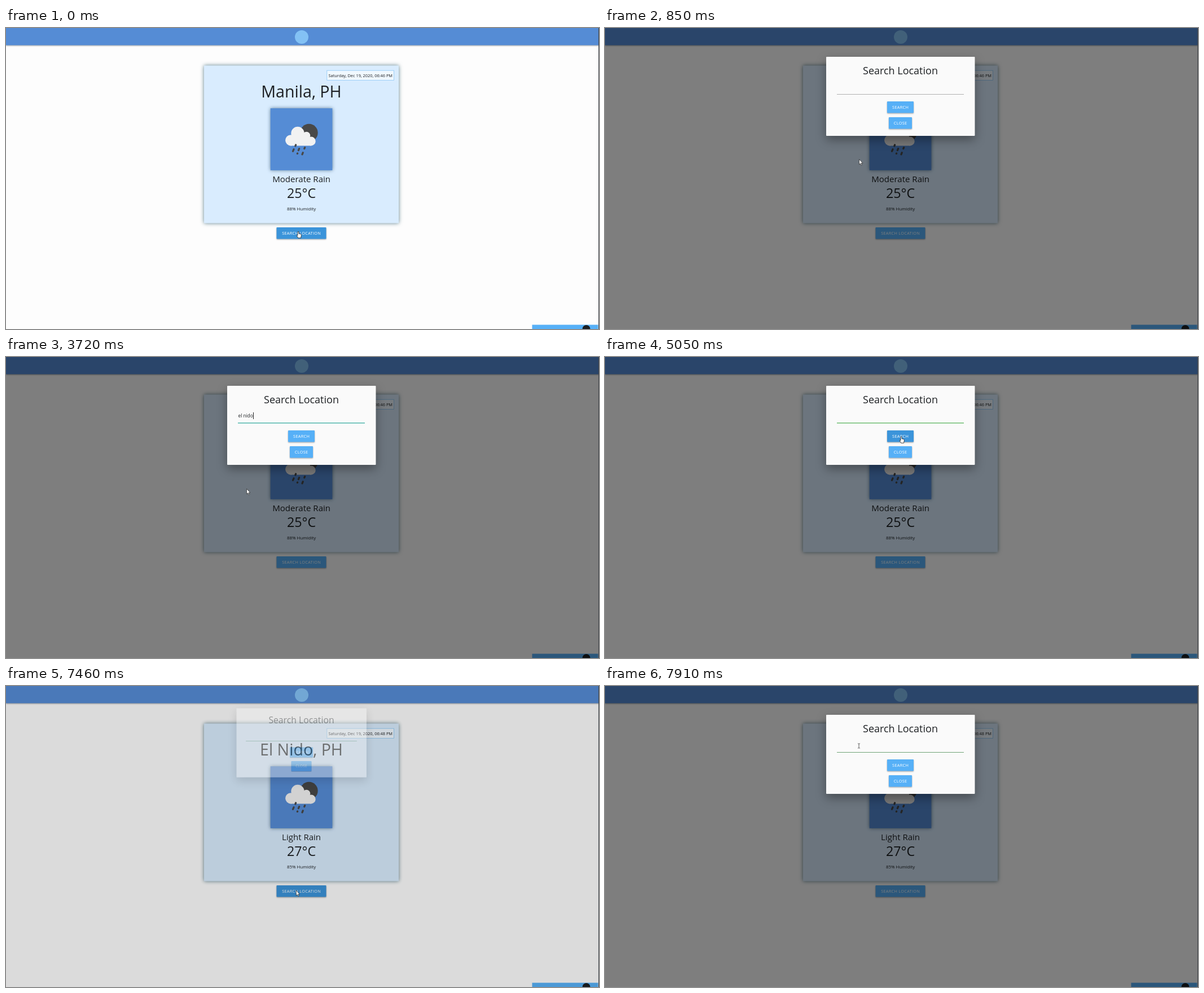
Recreate the animation shown at these times as an HTML page. Size 1051 px wide and 533 px high, loop 7.99 s.

```html
<!DOCTYPE html>
<html lang="en">
<head>
<meta charset="utf-8">
<title>Weather search</title>
<style>
  html, body { margin: 0; width: 100%; height: 100%; overflow: hidden; background: #fdfdfd; }
  svg { display: block; width: 1051px; height: 533px; font-family: "Open Sans", "Noto Sans", sans-serif; }
  text { fill: #1d2023; }
  .mid { text-anchor: middle; }
  .btn rect { fill: #56b0f7; filter: drop-shadow(0 1px .8px rgba(0,0,0,.35)); }
  .btn.hover rect { fill: #3b94da; }
  .btn text { fill: #fff; font-size: 7.35px; letter-spacing: .27px; text-anchor: middle; }
  #card { fill: #d9ecfe; filter: drop-shadow(0 0 3.5px rgba(50,95,110,.8)); }
  #tile { fill: #558cd5; filter: drop-shadow(0 0 3px rgba(40,80,110,.7)); }
  #bar { fill: #558cd5; filter: drop-shadow(0 1px 1px rgba(0,0,0,.35)); }
  #sheet { fill: #fafafa; filter: drop-shadow(0 7px 9px rgba(0,0,0,.35)); }
  #list > rect:first-child { fill: #fff; filter: drop-shadow(0 1px 1.5px rgba(0,0,0,.4)); }
  #list text { font-size: 6.75px; font-weight: 600; }
</style>
</head>
<body>
<svg viewBox="0 0 1051 533">
  <rect width="1051" height="533" fill="#fdfdfd"/>
  <rect id="bar" width="1051" height="30.5"/>
  <circle cx="524" cy="16" r="12" fill="#83c1f4"/>
  <rect x="932.5" y="525.5" width="117" height="8" fill="#56b0f7"/>
  <circle cx="1028.5" cy="533" r="7" fill="#1b1f23"/>

  <rect id="card" x="351" y="66.5" width="345" height="279"/>
  <rect x="568.8" y="75.2" width="118.6" height="17.3" fill="#f0f8ff" stroke="#8cc8f5" stroke-width=".8"/>
  <text id="date" class="mid" x="628.3" y="86.8" font-size="7.38"/>
  <text id="city" class="mid" x="523.5" y="122.5" font-size="28.6"/>
  <rect id="tile" x="468.7" y="142.2" width="109.7" height="109.7"/>
  <circle cx="537" cy="185.5" r="15.7" fill="#484848"/>
  <g fill="#f2f2f2">
    <circle cx="504.7" cy="198.8" r="9.6"/>
    <circle cx="517" cy="186.5" r="11.7"/>
    <circle cx="532.5" cy="190.5" r="6.8"/>
    <circle cx="540.7" cy="200.4" r="8"/>
    <path d="M504 192H538L541 208.4H504Z"/>
  </g>
  <path d="M513.6 207l-.7 2M510 214.8l-1.4 3.4M519.6 213.6l-1.2 3M529.6 211.6l-.8 2M516.6 222l-.2.4M526.2 220.8l-1.2 3"
        stroke="#484848" stroke-width="3.3" stroke-linecap="round"/>
  <text id="sky" class="mid" x="523.6" y="272.6" font-size="15.05"/>
  <text id="temp" class="mid" x="523.6" y="301" font-size="23.3"/>
  <text id="humid" class="mid" x="523.6" y="323.3" font-size="7.93"/>
  <g id="open" class="btn">
    <rect x="479.5" y="353" width="88" height="20.5" rx="1"/>
    <text x="523.6" y="366">SEARCH LOCATION</text>
  </g>

  <rect id="shade" width="1051" height="533"/>
  <g id="modal">
    <rect id="sheet" x="392" y="51" width="263.5" height="140" rx="1"/>
    <text class="mid" x="523.5" y="82" font-size="18">Search Location</text>
    <text id="typed" x="411.5" y="107.2" font-size="8.3">el nido</text>
    <rect id="line" x="411" width="225"/>
    <g id="find" class="btn">
      <rect x="500" y="130" width="47" height="20.5" rx="1"/>
      <text x="523.6" y="142.8">SEARCH</text>
    </g>
    <g class="btn">
      <rect x="503" y="158" width="41" height="20.5" rx="1"/>
      <text x="523.6" y="170.8">CLOSE</text>
    </g>
    <rect id="caret" y="98" width="1" height="12" fill="#222"/>
  </g>
  <g id="list">
    <rect x="411" y="118" width="225" height="127.5" rx="1.5"/>
    <rect id="row" x="411" width="225" height="19.75" fill="#e6e6e6"/>
  </g>

  <g id="cursor" stroke-linejoin="round">
    <path id="arrow" d="M0 0V9.2L2.1 7.3L3.6 10.7L5 10.1L3.5 6.8H6.3Z" fill="#fff" stroke="#222" stroke-width=".7"/>
    <path id="hand" d="M-1 .9Q0 -.5 1 .9V4.2L4.4 5Q5.5 5.3 5.4 6.5L4.6 11.8H-.2L-2.9 7.6Q-2.8 6.2 -1 7.4Z"
          fill="#fff" stroke="#222" stroke-width=".8"/>
    <path id="beam" d="M-2 -4H-.5L0 -3.5L.5 -4H2M0 -3.5V3.5M-2 4H-.5L0 3.5L.5 4H2" fill="none" stroke="#333" stroke-width=".8"/>
  </g>
  <rect x="1050" width="1" height="533" fill="#3c4046"/>
</svg>
<script>
const LOOP = 7990, ROW = 19.75;
const $ = id => document.getElementById(id);
const set = (id, attrs) => { for (const k in attrs) $(id).setAttribute(k, attrs[k]); };
const show = (id, on) => { $(id).style.display = on ? "" : "none"; };
const clamp = v => Math.max(0, Math.min(1, v));

// screen updates come in bursts: start, end, steps
const bursts = [
  [0, 0, 1], [80, 470, 6], [850, 1380, 8], [1610, 1860, 4], [2170, 2170, 1], [2710, 2710, 1],
  [3020, 3170, 3], [3330, 3720, 5], [3870, 4640, 11], [4950, 5430, 7], [6040, 6120, 2],
  [6360, 7150, 11], [7380, 7910, 8]
];

// pointer path: time, x, y, shape kept from then on
const path = [
  [0, 518, 360, "hand"], [120, 517, 361, "arrow"], [800, 517, 361, "arrow"], [850, 450.5, 232.5, "arrow"],
  [1000, 372, 175, "arrow"], [1230, 392, 128, "arrow"], [1380, 420, 106, "beam"], [1610, 422, 108, "beam"],
  [1700, 426.5, 116, "beam"], [2950, 426.5, 116, "beam"], [3020, 428, 98, "beam"], [3090, 429, 140, "arrow"],
  [3170, 429, 218, "arrow"], [3330, 428, 232, "arrow"], [3870, 426, 234, "arrow"], [4250, 470, 200, "arrow"],
  [4480, 515, 160, "arrow"], [4560, 525, 140.5, "hand"], [5420, 525, 140.5, "hand"], [5430, 129, 293.8, "arrow"],
  [6040, 128.5, 294, "arrow"], [6360, 129, 293, "arrow"], [6440, 150, 282, "arrow"], [6800, 400, 305, "arrow"],
  [7150, 516, 360, "hand"], [7380, 516, 360, "hand"], [7420, 514.3, 362, "arrow"], [7680, 514.3, 362, "arrow"],
  [7910, 450, 106, "beam"]
];

["dagupan", "baguio", "Manila", "Pampanga", "Cebu", "el nido"].forEach((name, i) => {
  const item = document.createElementNS($("list").namespaceURI, "text");
  item.setAttribute("x", 417.8);
  item.setAttribute("y", 135.1 + ROW * i);
  item.textContent = name;
  $("list").append(item);
});

function snap(t) {
  const [start, end, n] = bursts.findLast(b => b[0] <= t);
  const step = n > 1 ? (end - start) / (n - 1) : 0;
  return step ? Math.round(start + step * Math.min(n - 1, Math.floor((t - start) / step + 1e-6))) : start;
}

function pointer(t) {
  const i = path.findLastIndex(k => k[0] <= t), a = path[i], b = path[i + 1] || a;
  const f = a === b ? 0 : (t - a[0]) / (b[0] - a[0]);
  return { x: a[1] + (b[1] - a[1]) * f, y: a[2] + (b[2] - a[2]) * f, shape: a[3] };
}

// modal progress and backdrop opacity
function modalAt(t) {
  const closing = t >= 5100 && t < 7420;
  const rest = 1 - clamp((t - (closing ? 5100 : t < 5100 ? 120 : 7420)) / 250);
  return closing ? [rest ** 2, rest ** 2 / 2] : [1 - rest ** 3, (1 - rest ** 2) / 2];
}

function draw(t) {
  const later = t >= 5430;
  $("date").textContent = `Saturday, Dec 19, 2020, 06:4${later ? 8 : 6} PM`;
  $("city").textContent = later ? "El Nido, PH" : "Manila, PH";
  $("sky").textContent = later ? "Light Rain" : "Moderate Rain";
  $("temp").textContent = later ? "27°C" : "25°C";
  $("humid").textContent = `${later ? 85 : 88}% Humidity`;

  const [p, shade] = modalAt(t), s = 0.8 + 0.2 * p;
  set("shade", { opacity: shade });
  set("modal", {
    opacity: p,
    transform: `translate(523.5 ${121 - 32.5 * (1 - p)}) scale(${s}) translate(-523.5 -121)`
  });

  const focused = t >= 1640 && t < 4950, valid = t >= 4950 && t < 7420;
  const bold = focused || valid;
  set("line", {
    y: bold ? 116.3 : 117,
    height: bold ? 1.2 : 0.8,
    fill: focused ? "#26a69a" : valid ? "#4caf50" : t < 4950 ? "#9e9e9e" : "#4f8f57"
  });

  const filled = t >= 3330 && t < 4950;
  show("typed", filled);
  const blink = t - (filled ? 3600 : 1640);
  show("caret", focused && (blink < 0 || Math.floor(blink / 530) % 2 === 0));
  set("caret", { x: filled ? 438 : 411 });

  const c = pointer(t);
  show("list", t >= 1690 && t < 3500);
  show("row", t >= 3090);
  set("row", { y: 123 + ROW * Math.max(0, Math.floor((c.y - 123) / ROW)) });
  $("open").classList.toggle("hover", t < 220 || (t >= 7140 && t < 7520));
  $("find").classList.toggle("hover", t >= 4550 && t < 5430);

  set("cursor", { transform: `translate(${c.x} ${c.y})` });
  for (const shape of ["arrow", "hand", "beam"]) show(shape, shape === c.shape);
}

const begin = performance.now();
function tick() {
  draw(snap((performance.now() - begin) % LOOP));
  requestAnimationFrame(tick);
}
tick();
</script>
</body>
</html>
```
